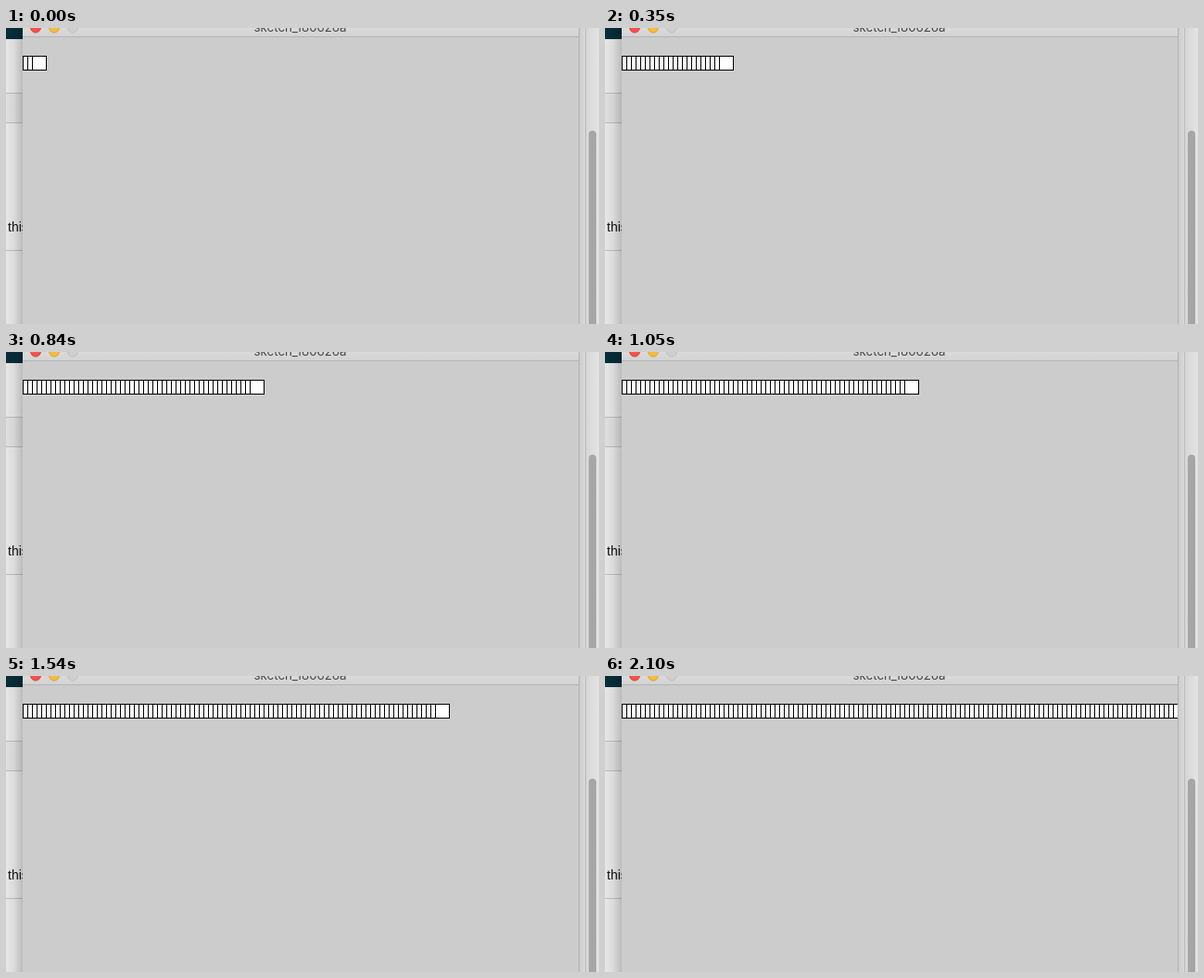
These frames come from a looping animation (640x320 px, 2170 ms). An HTML page with a canvas:

```html
<!DOCTYPE html>
<html lang="en">
<head>
<meta charset="utf-8">
<title>Row of squares</title>
<style>
html, body { margin: 0; width: 100%; height: 100%; overflow: hidden; }
canvas { display: block; width: 640px; height: 320px; }
</style>
</head>
<body>
<canvas id="stage" width="640" height="320"></canvas>
<script>
const ctx = document.getElementById('stage').getContext('2d');
const STEP = 70, STEPS = 31;
const LEFT = 18, RIGHT = 618, TOP = 30, SIZE = 15, GAP = 5;

function box(color, x, y, w, h) {
  ctx.fillStyle = color;
  ctx.fillRect(x, y, w, h);
}

function gradient(x0, y0, x1, y1, ...colors) {
  const g = ctx.createLinearGradient(x0, y0, x1, y1);
  colors.forEach((c, i) => g.addColorStop(i / (colors.length - 1), c));
  return g;
}

function label(text, x, y, font, color, align) {
  ctx.font = font;
  ctx.fillStyle = color;
  ctx.textAlign = align;
  ctx.fillText(text, x, y);
}

function button(x, fill, edge) {
  ctx.beginPath();
  ctx.arc(x, -0.5, 5.5, 0, Math.PI * 2);
  ctx.fillStyle = fill;
  ctx.fill();
  ctx.strokeStyle = edge;
  ctx.lineWidth = 1;
  ctx.stroke();
}

function drawPage() {
  box('#f3f3f3', 0, 0, 640, 320);
  box('#ebebeb', 0, 71, LEFT, 31);
  for (const y of [70, 102, 240]) box('#c8c8c8', 0, y, LEFT, 1);
  box('#07303d', 0, 0, LEFT, 12);
  label('this', 2, 220, '14px "Liberation Sans", Arial, sans-serif', '#111', 'left');
  // Shadow cast by the window on both sides
  box(gradient(0, 0, LEFT, 0, 'rgba(0,0,0,.05)', 'rgba(0,0,0,.1)', 'rgba(0,0,0,.23)'), 0, 0, LEFT, 320);

  box('#eaeaea', 626, 0, 14, 320);
  box('#d2d2d2', 625, 0, 1, 320);
  box(gradient(RIGHT, 0, 640, 0, 'rgba(0,0,0,.17)', 'rgba(0,0,0,.07)', 'rgba(0,0,0,.03)'), RIGHT, 0, 22, 320);
  ctx.beginPath();
  ctx.roundRect(629, 111, 8, 230, 4);
  ctx.fillStyle = '#a6a6a6';
  ctx.fill();
}

function drawWindow() {
  box('#cccccc', LEFT, 0, RIGHT - LEFT, 320);
  box(gradient(0, 0, 0, 9, '#dadada', '#d3d3d3'), LEFT, 0, RIGHT - LEFT, 9);
  box('#b4b4b4', LEFT, 9, RIGHT - LEFT, 1);
  box('#b2b2b2', RIGHT, 0, 1, 320);
  button(32, '#f4534e', '#dc4743');
  button(52, '#f5bc3c', '#dba435');
  button(72, '#cfcfcf', '#c0c0c0');
  label('sketch_180626a', 317.5, 4, '13.3px Inter, sans-serif', '#474747', 'center');
}

// Four squares per step, with small hitches at the start and near the end
function lastSquare(step) {
  return 4 * step + (step === 0 || step > 24 ? 2 : 1);
}

function drawSquares(last) {
  ctx.save();
  ctx.beginPath();
  ctx.rect(LEFT, TOP, RIGHT - LEFT, SIZE + 1);
  ctx.clip();
  for (let i = 0; i <= last; i++) {
    const x = LEFT + i * GAP;
    box('#000', x, TOP, SIZE + 1, SIZE + 1);
    box('#fff', x + 1, TOP + 1, SIZE - 1, SIZE - 1);
  }
  ctx.restore();
}

const start = performance.now();

function frame() {
  const time = performance.now() - start;
  drawPage();
  drawWindow();
  drawSquares(lastSquare(Math.floor(time / STEP) % STEPS));
  requestAnimationFrame(frame);
}
frame();
</script>
</body>
</html>
```
